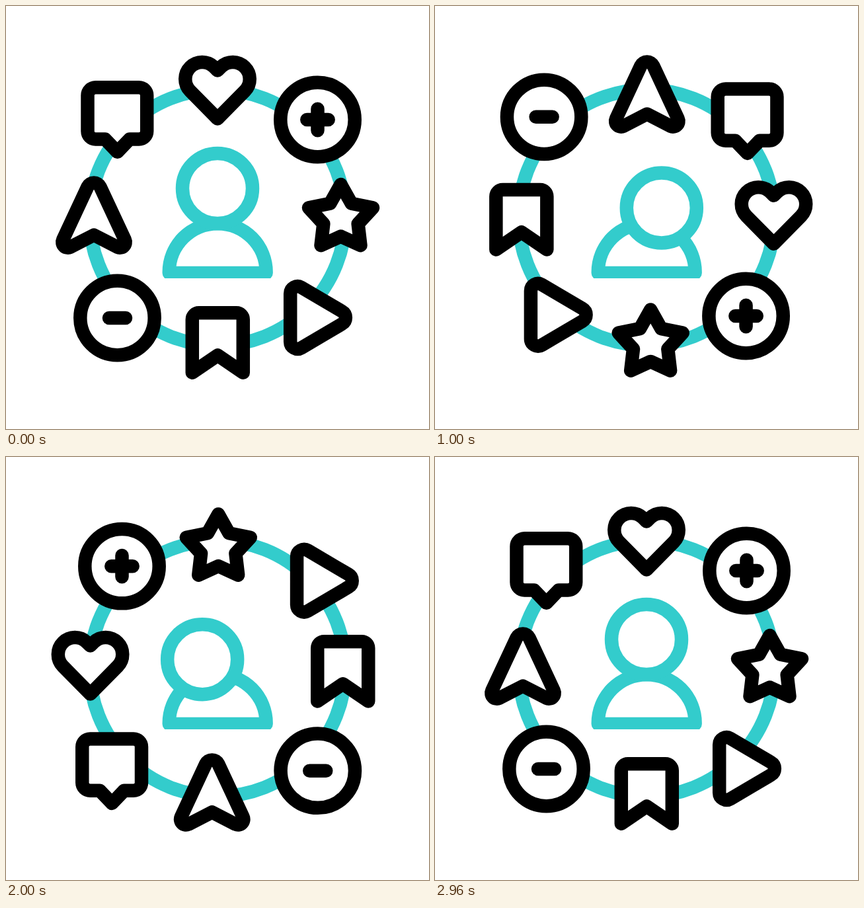
These frames come from a looping animation (640 px wide and 640 px high, 3 s). An HTML page:

```html
<!DOCTYPE html>
<html lang="en">
<head>
<meta charset="utf-8">
<title>User activity ring</title>
<style>
  html, body { margin: 0; width: 100%; height: 100%; overflow: hidden; background: #fff; }
  svg { display: block; width: 100vw; height: 100vh; }
  .teal, .icon { fill: #fff; stroke: #000; stroke-width: 20.5; stroke-linecap: round; stroke-linejoin: round; }
  .teal { stroke: #3cc; }
</style>
</head>
<body>
<svg viewBox="0 0 640 640">
  <clipPath id="floor"><rect width="640" height="412"/></clipPath>
  <g class="teal">
    <circle cx="320" cy="320" r="193.5"/>
    <path clip-path="url(#floor)" d="M246.8 404V402.5A73.4 73.4 0 0 1 393.6 402.5V404Z"/>
    <circle id="head" cx="320" cy="276" r="53"/>
  </g>
  <!-- data-arm: vector from the icon's pivot to its resting place -->
  <g class="icon" data-arm="0 -192.5">
    <path d="M320 170.5L278.5 128.4A25.6 25.6 0 0 1 314.7 92.2L320 97.5L325.3 92.2A25.6 25.6 0 0 1 361.5 128.4Z"/>
  </g>
  <g class="icon" data-arm="151.5 -148">
    <circle cx="471.5" cy="172" r="56.2"/>
    <path d="M455.3 172h32.4M471.5 155.8v32.4"/>
  </g>
  <g class="icon" data-arm="186.5 -3"><polygon id="star"/></g>
  <g class="icon" data-arm="140.5 147.2">
    <path d="M430.2 435.2A11 11 0 0 1 446.8 425.7L508.4 462A11 11 0 0 1 508.4 481L446.8 517.3A11 11 0 0 1 430.2 507.8Z"/>
  </g>
  <g class="icon" data-arm="0 189.5">
    <path d="M281.8 554.7V474.5A10.2 10.2 0 0 1 292 464.3H348.6A10.2 10.2 0 0 1 358.8 474.5V554.7L320.3 528.5Z"/>
  </g>
  <g class="icon" data-arm="-153 153.8">
    <circle cx="168.5" cy="472" r="56.2"/>
    <path d="M156 472h25"/>
  </g>
  <g class="icon" data-arm="-187 -4">
    <path d="M123.5 273.5A10.6 10.6 0 0 1 142.5 273.5L179.9 353.7A8.4 8.4 0 0 1 168.8 364.9L133 346.5L97.2 364.9A8.4 8.4 0 0 1 86.1 353.7Z"/>
  </g>
  <g class="icon" data-arm="-151 -155.8">
    <path d="M135.5 123.3H201.2A12 12 0 0 1 213.2 135.3V189.5A12 12 0 0 1 201.2 201.5H187L168.5 220.8L150 201.5H135.5A12 12 0 0 1 123.5 189.5V135.3A12 12 0 0 1 135.5 123.3Z"/>
  </g>
</svg>
<script>
  const LOOP = 3000, START = 80, END = 2920;
  const head = document.getElementById('head');

  const icons = [...document.querySelectorAll('.icon')].map(el => {
    const [x, y] = el.dataset.arm.split(' ').map(Number);
    return { el, x, y };
  });

  // Five-pointed star
  document.getElementById('star').setAttribute('points', Array.from({ length: 10 }, (_, i) => {
    const r = i % 2 ? 27.5 : 51, a = i * Math.PI / 5;
    return [506.5 + r * Math.sin(a), 321 - r * Math.cos(a)];
  }).join(' '));

  // Head path, relative to its resting place
  const legs = [
    [START, 940, 'M0 0C0 0 27 23.7 23.2 29'],
    [940, 1860, 'M23.2 29C19.5 34.3 -18.7 36.9 -22.5 32'],
    [1860, END, 'M-22.5 32C-26.3 27.1 0 0 0 0']
  ].map(([from, to, d]) => {
    const path = document.createElementNS('http://www.w3.org/2000/svg', 'path');
    path.setAttribute('d', d);
    return { from, to, path, length: path.getTotalLength() };
  });

  function ease(t, from, to) {
    const u = Math.min(1, Math.max(0, (t - from) / (to - from)));
    return u * u * (3 - 2 * u);
  }

  function move(el, x, y) {
    el.setAttribute('transform', `translate(${x} ${y})`);
  }

  function draw(t) {
    const turn = 2 * Math.PI * ease(t, START, END);
    const c = Math.cos(turn), s = Math.sin(turn);
    for (const { el, x, y } of icons) move(el, x * c - y * s - x, x * s + y * c - y);

    const leg = legs.find(l => t < l.to) || legs[2];
    const p = leg.path.getPointAtLength(leg.length * ease(t, leg.from, leg.to));
    move(head, p.x, p.y);
  }

  function tick() {
    draw(performance.now() % LOOP);
    requestAnimationFrame(tick);
  }
  tick();
</script>
</body>
</html>
```
